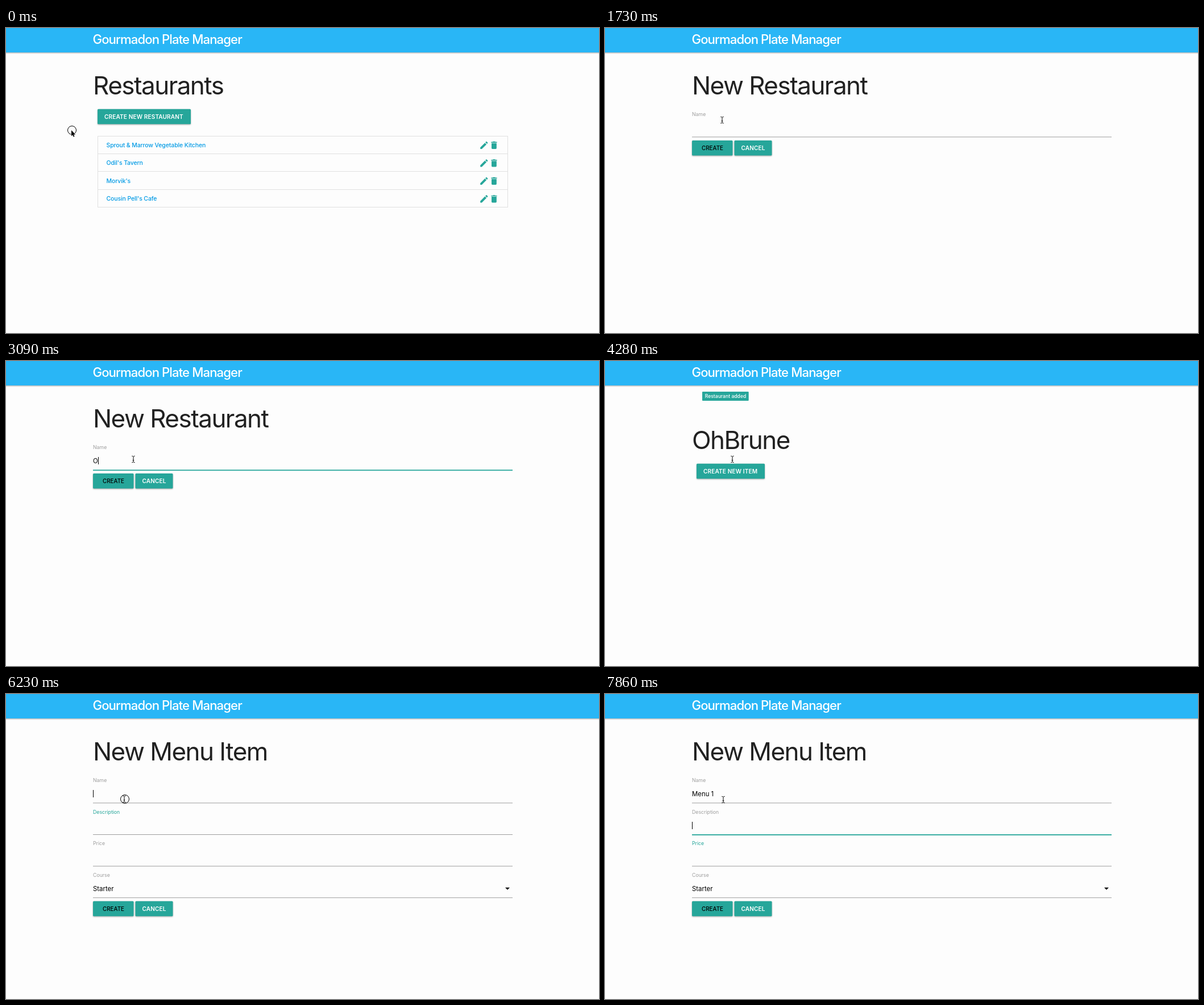
Animation, 1043 px wide and 537 px high, one loop 8 s. Source, as an HTML page:

```html
<!DOCTYPE html>
<html lang="en">
<head>
<meta charset="utf-8">
<title>Menu planner demo</title>
<style>
  html, body { margin: 0; width: 100%; height: 100%; overflow: hidden; background: #fdfdfd; }
  svg { display: block; width: 100%; height: 100%; }
  text { font-family: Inter, Roboto, "Liberation Sans", sans-serif; font-optical-sizing: none; }
  .bar { fill: #29b6f6; filter: drop-shadow(0 1.2px 1px rgba(0, 0, 0, .36)); }
  .brand { font-size: 22.2px; font-weight: 450; letter-spacing: -.042em; fill: #fff; }
  .head { font-size: 44px; letter-spacing: -.035em; fill: #212121; }
  .link { font-size: 10.5px; font-weight: 500; letter-spacing: -.012em; fill: #039be5; }
  .box { fill: #26a69a; }
  .btn { filter: drop-shadow(0 1.2px 1.1px rgba(0, 0, 0, .34)); }
  .hover .btn { filter: drop-shadow(0 2px 2.4px rgba(0, 0, 0, .42)); }
  .cap { font-size: 10.1px; font-weight: 600; letter-spacing: .12px; fill: #fff; }
  .submit { font-size: 9.9px; font-weight: 450; fill: #000; text-anchor: middle; }
  .badge { font-size: 8.6px; font-weight: 500; fill: #fff; }
  .label { font-size: 8.75px; fill: #9e9e9e; }
  .label.on { fill: #26a69a; }
  .value { font-size: 11.4px; fill: #000; }
  .option { font-size: 9.5px; font-weight: 450; fill: #111; }
  .line { fill: #9e9e9e; }
  .line.on { fill: #26a69a; height: 1.8px; }
  .frame { fill: none; stroke: #e0e0e0; shape-rendering: crispEdges; }
  .panel { fill: #fff; stroke: #ddd; stroke-width: .5; filter: drop-shadow(0 1.2px 1.2px rgba(0, 0, 0, .35)); }
</style>
</head>
<body>
<svg id="stage" viewBox="0 0 1043 537">
  <defs>
    <g id="edit" class="box" transform="scale(.735)">
      <path d="M3 17.25V21h3.75L17.81 9.94l-3.75-3.75zM20.71 7.04c.39-.39.39-1.02 0-1.41l-2.34-2.34c-.39-.39-1.02-.39-1.41 0l-1.83 1.83 3.75 3.75z"/>
    </g>
    <g id="trash" class="box" transform="scale(.735)">
      <path d="M6 19c0 1.1.9 2 2 2h8c1.1 0 2-.9 2-2V7H6zM19 4h-3.5l-1-1h-5l-1 1H5v2h14z"/>
    </g>
  </defs>
  <rect width="1043" height="537" fill="#fdfdfd"/>
  <rect class="bar" x="-5" y="-5" width="1053" height="48"/>
  <text class="brand" x="152.5" y="28">Gourmadon Plate Manager</text>
  <g id="pages"></g>
  <rect id="caret" width="1" height="13"/>
  <g id="popup"></g>
  <g id="cursor">
    <circle id="ring" cx="1" r="7.5" fill="none" stroke="#000"/>
    <path id="arrow" d="M0 0V10.3L2.3 8.2 3.8 11.7 5.5 11 4 7.5H7.2Z" stroke="#fff" stroke-width="1.2" paint-order="stroke"/>
    <path id="beam" d="M-2.6-5.7Q-.4-5.7 0-4.5Q.4-5.7 2.6-5.7M0-4.5V4.5M-2.6 5.7Q-.4 5.7 0 4.5Q.4 5.7 2.6 5.7M-1.3 1.8H1.3" fill="none" stroke="#000"/>
    <path id="hand" d="M-1 1Q0-.8 1 1V5Q2.4 4.2 3 5.4Q4.4 4.8 5 6Q6.6 5.6 6.6 7.4V9.5L5.4 13H-.6L-4.2 8Q-4.2 6.4-2.6 7L-1 8.6Z" fill="#fff" stroke="#000"/>
  </g>
</svg>
<script>
const LOOP = 8000, LEFT = 153, ROW = 55.6, OPTION = 26.4;
const $ = id => document.getElementById(id);
const newName = 'OhBrune';
const history = ['Melde', 'Melde Gaststube', 'Melde1', 'My Noodle', 'Kitchen Corner 2', 'Tasting'];

const text = (cls, x, y, str) => `<text class="${cls}" x="${x}" y="${y}">${str}</text>`;
const heading = (y, str) => text('head', LEFT, y, str);
const rect = (cls, x, y, w, h, rx = 0) =>
  `<rect class="${cls}" x="${x}" y="${y}" width="${w}" height="${h}" rx="${rx}"/>`;
const group = (id, body) => `<g id="${id}">${body}</g>`;
const button = (x, y, w, label) =>
  rect('box btn', x, y, w, 26.5, 1.5) + text('cap', x + 12, y + 17.2, label);

function listRow(name, i) {
  const y = 190 + i * 31.45;
  return rect('frame', 161.5, y, 721, 31.45) + text('link', 176.5, y + 20, name) +
    `<use href="#edit" x="832" y="${y + 7.6}"/><use href="#trash" x="849.6" y="${y + 7.6}"/>`;
}

function field(label, i) {
  const y = i * ROW;
  const select = label === 'Course';
  return text('label', LEFT, 155 + y, label) +
    text(select ? 'value' : 'value typed', LEFT, 180 + y, select ? 'Starter' : '') +
    rect('line', LEFT, 191.4 + y, 738, 1) +
    (select ? `<path d="M878 ${174 + y}h8l-4 4z"/>` : '');
}

function form(id, title, labels) {
  const y = 198 + (labels.length - 1) * ROW;
  return group(id, heading(117, title) + labels.map(field).join('') +
    rect('box btn', LEFT, y, 71.5, 26.5, 1.5) + text('submit', 189, y + 17.2, 'CREATE') +
    button(227.5, y, 66, 'CANCEL'));
}

$('pages').innerHTML =
  group('list', heading(117, 'Restaurants') +
    button(161, 142.7, 164, 'CREATE NEW RESTAURANT') +
    ['Sprout &amp; Marrow Vegetable Kitchen', "Odil's Tavern", "Morvik's", "Cousin Pell's Cafe"]
      .map(listRow).join('')) +
  form('addPlace', 'New Restaurant', ['Name']) +
  group('detail', rect('box', 171, 54, 81.7, 16, 1) + text('badge', 175.7, 65.2, 'Restaurant added') +
    heading(155, newName) + button(161, 180.8, 120, 'CREATE NEW ITEM')) +
  form('addItem', 'New Menu Item', ['Name', 'Description', 'Price', 'Course']);

// Each step overrides the state before it; focus and line are field indexes, -1 is none.
const idle = { typed: '', focus: -1, line: -1, options: 0, blink: false };
const steps = [
  { t: 0, ...idle, page: 'list', cursor: 'arrow', x: 115, y: 180, ring: true, hover: false },
  { t: 150, ring: false },
  { t: 540, x: 136, y: 214 },
  { t: 690, x: 166, y: 259 },
  { t: 830, x: 194, y: 204 },
  { t: 980, x: 206, y: 159, cursor: 'hand', hover: true, ring: true },
  { t: 1580, ...idle, page: 'addPlace', x: 206, y: 160, hover: false, ring: false },
  { t: 1730, cursor: 'beam', y: 162 },
  { t: 1880, x: 214, y: 167 },
  { t: 2030, x: 223, y: 173 },
  { t: 2190, focus: 0, x: 224, ring: true },
  { t: 2340, line: 0, options: 6, ring: false },
  { t: 2640, blink: true },
  ...[...newName].map((_, i) => ({
    t: 3090 + Math.round(i * 148.3), typed: newName.slice(0, i + 1), blink: false, options: 0
  })),
  { t: 4280, ...idle, page: 'detail' },
  { t: 4720, cursor: 'arrow', x: 221, y: 178 },
  { t: 4870, cursor: 'hand', x: 216, y: 186, hover: true },
  { t: 5010, x: 213, y: 190 },
  { t: 5160, ring: true },
  { t: 5310, ring: false },
  { t: 5450, ...idle, page: 'addItem', cursor: 'beam', hover: false },
  { t: 5900, x: 211, y: 188 },
  { t: 6080, x: 208, y: 185 },
  { t: 6230, focus: 0, ring: true },
  { t: 6380, line: 0, ring: false, y: 186 },
  { t: 6530, options: 6 },
  { t: 6830, typed: 'M', options: 4 },
  { t: 6980, typed: 'Men', options: 0 },
  { t: 7120, typed: 'Menu\u00a0' },
  { t: 7420, typed: 'Menu\u00a01' },
  { t: 7710, focus: 1 },
  { t: 7860, line: 1 }
];
const states = [];
steps.forEach((step, i) => states.push({ ...states[i - 1], ...step }));

const show = (el, on) => { el.style.display = on ? '' : 'none'; };

function popup(count) {
  if (!count) return '';
  return rect('panel', LEFT, 195, count > 4 ? 124 : 114, count * OPTION + 10.2, 1) +
    history.slice(0, count).map((name, i) => text('option', 162, 216.5 + i * OPTION, name)).join('');
}

function draw(s) {
  for (const page of $('pages').children) show(page, page.id === s.page);
  const page = $(s.page);
  page.classList.toggle('hover', s.hover);
  page.querySelectorAll('.label').forEach((el, i) =>
    el.classList.toggle('on', s.focus >= 0 && i === s.focus + 1));
  page.querySelectorAll('.line').forEach((el, i) => el.classList.toggle('on', i === s.line));

  const inputs = page.querySelectorAll('.typed');
  if (inputs.length) inputs[0].textContent = s.typed;
  show($('caret'), s.focus >= 0 && !s.blink);
  if (s.focus >= 0) {
    const width = inputs[s.focus].textContent ? inputs[s.focus].getComputedTextLength() : 0;
    $('caret').setAttribute('x', Math.round(LEFT + width));
    $('caret').setAttribute('y', Math.round(169 + s.focus * ROW));
  }

  $('popup').innerHTML = popup(s.options);
  $('cursor').setAttribute('transform', `translate(${s.x} ${s.y})`);
  for (const kind of ['arrow', 'beam', 'hand']) show($(kind), kind === s.cursor);
  show($('ring'), s.ring);
}

let current;
function tick() {
  const now = performance.now() % LOOP;
  const state = states.findLast(s => s.t <= now);
  if (state !== current) draw(current = state);
  requestAnimationFrame(tick);
}
tick();
</script>
</body>
</html>
```
